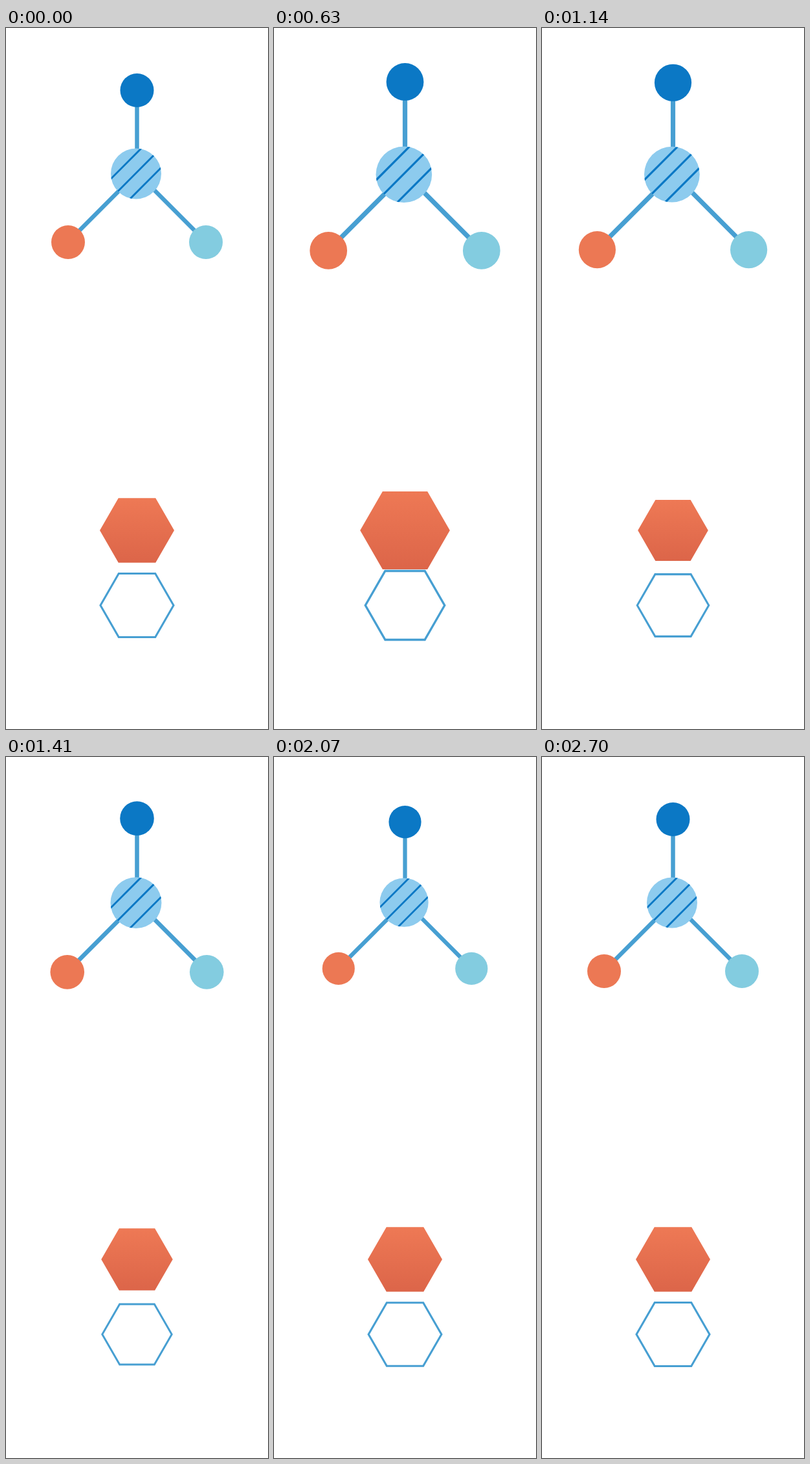
An HTML page with a canvas for the animation above (2730 ms loop, 405 by 1080 pixels).

```html
<!DOCTYPE html>
<html lang="en">
<head>
<meta charset="utf-8">
<title>Pulsing shapes</title>
<style>
  html, body { margin: 0; width: 100%; height: 100%; overflow: hidden; background: #fff; }
  canvas { display: block; width: 405px; height: 1080px; }
</style>
</head>
<body>
<canvas id="stage" width="405" height="1080"></canvas>
<script>
const ctx = document.getElementById('stage').getContext('2d');
const LOOP = 2730, STEP = 30;
const BLUE = '#0b78c5', SKY = '#8dcbee', TEAL = '#83cce0', LINE = '#479fd2', ORANGE = '#ec7854';

// Cubic bezier (0.42, 0, 1, 1), solved for x by bisection
function easeIn(x) {
  let lo = 0, hi = 1;
  for (let i = 0; i < 24; i++) {
    const u = (lo + hi) / 2, v = 1 - u;
    if (3 * v * v * u * 0.42 + 3 * v * u * u + u * u * u < x) lo = u; else hi = u;
  }
  return lo * lo * (3 - 2 * lo);
}
const easeOut = x => 1 - easeIn(1 - x);

// Swell to peak, dip to low, settle back; each phase lasts `phase` ms
function pulse(t, phase, peak, low) {
  const p = t / phase;
  if (p < 1) return 1 + (peak - 1) * easeIn(p);
  if (p < 2) return peak + (low - peak) * easeOut(p - 1);
  if (p < 3) return low + (1 - low) * (p - 2);
  return 1;
}

function scaled(cx, cy, s, draw) {
  ctx.save();
  ctx.translate(cx, cy);
  ctx.scale(s, s);
  ctx.translate(-cx, -cy);
  draw(cx, cy);
  ctx.restore();
}

function disc(x, y, r, color) {
  ctx.beginPath();
  ctx.arc(x, y, r, 0, Math.PI * 2);
  ctx.fillStyle = color;
  ctx.fill();
}

function line(x1, y1, x2, y2, width, color) {
  ctx.beginPath();
  ctx.moveTo(x1, y1);
  ctx.lineTo(x2, y2);
  ctx.lineWidth = width;
  ctx.strokeStyle = color;
  ctx.stroke();
}

function hexPath(cx, cy, r) {
  ctx.beginPath();
  for (let i = 0; i < 6; i++) {
    const a = i * Math.PI / 3;
    ctx.lineTo(cx + r * Math.cos(a), cy + r * Math.sin(a));
  }
  ctx.closePath();
}

function molecule() {
  line(202.5, 96, 202.5, 224, 6.5, LINE);
  line(96, 329.5, 201, 224.5, 6.5, LINE);
  line(309, 329.5, 203.5, 224, 6.5, LINE);
  disc(202.5, 96, 26, BLUE);
  disc(96, 330, 26, ORANGE);
  disc(309, 330, 26, TEAL);
  disc(201, 224.5, 39, SKY);
  ctx.clip();
  for (const sum of [394.5, 424.5, 455]) line(150, sum - 150, 250, sum - 250, 2.9, BLUE);
}

function solidHex(cx, cy) {
  const fill = ctx.createLinearGradient(0, cy - 50, 0, cy + 50);
  fill.addColorStop(0, '#ee7955');
  fill.addColorStop(1, '#dc6549');
  hexPath(cx, cy, 57.5);
  ctx.fillStyle = fill;
  ctx.fill();
}

function outlineHex(cx, cy) {
  hexPath(cx, cy, 56.5);
  ctx.lineWidth = 3.1;
  ctx.strokeStyle = LINE;
  ctx.stroke();
}

function render(now) {
  const t = Math.floor((now % LOOP) / STEP) * STEP;
  ctx.fillStyle = '#fff';
  ctx.fillRect(0, 0, 405, 1080);
  scaled(202.5, 213.5, pulse(t, 900, 1.2, 0.95), molecule);
  scaled(202.5, 774, pulse(t, 600, 1.23, 0.94), solidHex);
  scaled(202.5, 889.5, pulse(t, 700, 1.1, 0.95), outlineHex);
}

const start = performance.now();
function tick() {
  render(performance.now() - start);
  requestAnimationFrame(tick);
}
tick();
</script>
</body>
</html>
```
